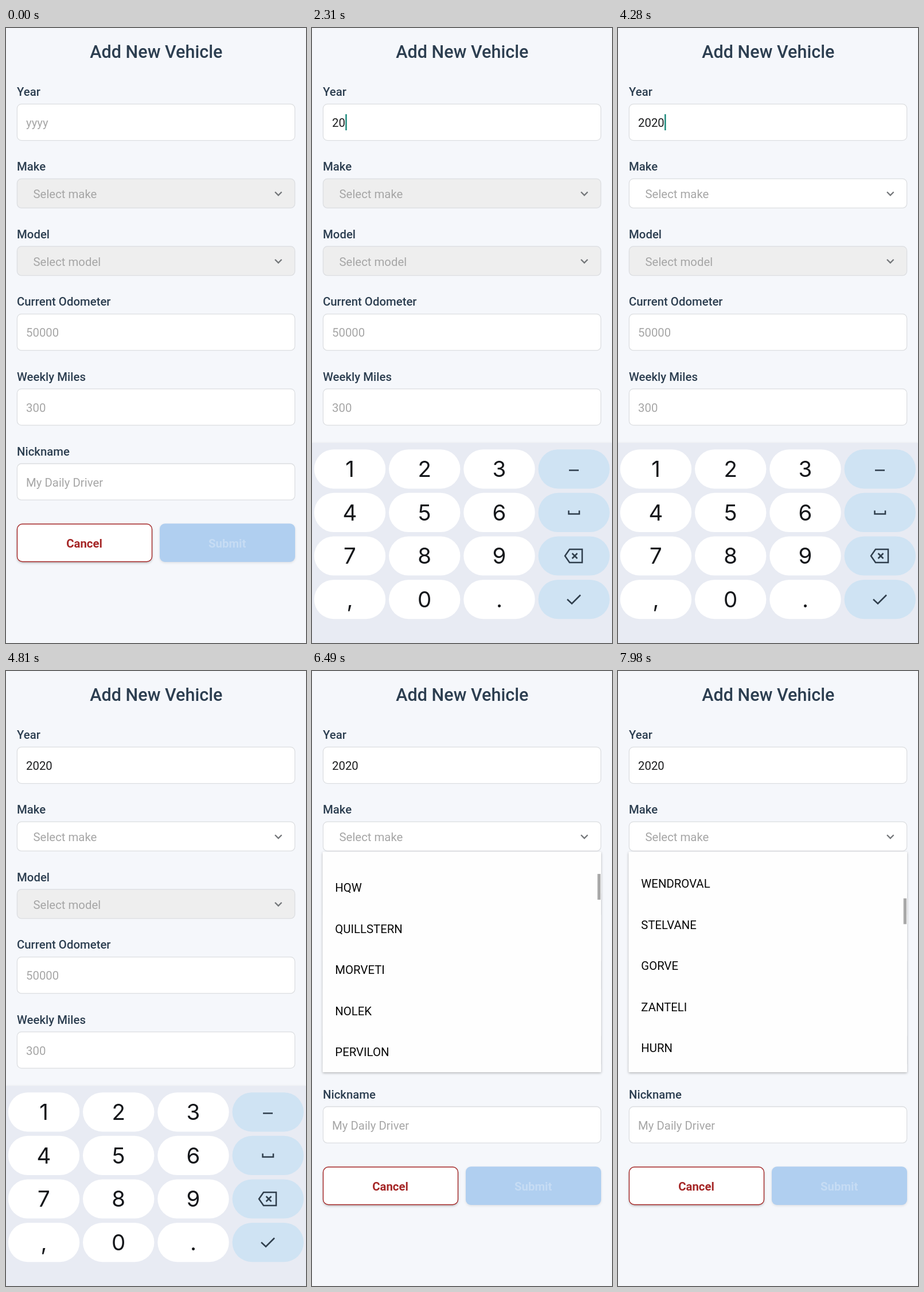
These frames come from a looping animation (523 by 1070 pixels, 8000 ms). An HTML page with a canvas:

```html
<!DOCTYPE html>
<html lang="en">
<head>
<meta charset="utf-8">
<title>Add New Vehicle</title>
<style>
  html, body { margin: 0; width: 100%; height: 100%; overflow: hidden; background: #f5f7fb; }
  canvas { display: block; width: 523px; height: 1070px; }
</style>
</head>
<body>
<canvas id="stage"></canvas>
<script>
const W = 523, H = 1070, LOOP = 8000;
const canvas = document.getElementById('stage');
const ctx = canvas.getContext('2d');
const dpr = window.devicePixelRatio || 1;
canvas.width = W * dpr;
canvas.height = H * dpr;

const BG = '#f5f7fb', INK = '#2c3e50', HINT = '#a6a6a6', TEAL = '#128577', RED = '#a52626';
const BODY = '20.36px Roboto, sans-serif';
const LABEL = '500 20.36px Roboto, sans-serif';
const BOLD = '700 20.36px Roboto, sans-serif';
const TITLE = '500 30.54px Roboto, sans-serif';
const DIGIT = '400 38.5px Inter, sans-serif';

const MAKES = ['OVELA', 'DELA VORIN', 'WEXTON LARBY', 'UDRO', 'GRENLOW', 'HQW', 'QUILLSTERN',
  'MORVETI', 'NOLEK', 'PERVILON', 'WENDROVAL', 'STELVANE', 'GORVE', 'ZANTELI', 'HURN'];
const ROW = 71.35;
const LIST = { x: 18.5, y: 314.5, w: 485.5, h: 383.5 };

// [time, value]
const TYPED = [[0, ''], [1910, '2'], [2140, '20'], [2540, '200'], [3340, '20'], [3730, '202'], [4130, '2020']];
const LOADED = [[0, 10], [5950, 20], [6030, 30], [6180, 46]];
// [time, column, row]
const PRESSES = [[2140, 1, 3], [2540, 1, 3], [3340, 3, 2], [3730, 1, 0], [4130, 1, 3], [4660, 3, 3]];
const KEYS = ['123', '456', '789', ',0.'];
const KEYBOARD_TOP = 722;

const clamp = v => Math.max(0, Math.min(1, v));
const latest = (list, t) => list.filter(e => e[0] <= t).pop()[1];
const stepped = (t, start, size) => t < start ? t : start + Math.floor((t - start) / size) * size;

function box(x, y, w, h, r, fill, stroke, line = 1.27) {
  ctx.beginPath();
  ctx.roundRect(x, y, w, h, r);
  if (fill) { ctx.fillStyle = fill; ctx.fill(); }
  if (stroke) { ctx.strokeStyle = stroke; ctx.lineWidth = line; ctx.stroke(); }
}

function text(str, x, y, font, color, align = 'left') {
  ctx.font = font;
  ctx.fillStyle = color;
  ctx.textAlign = align;
  ctx.fillText(str, x, y);
}

function line(points, color, width, close) {
  ctx.beginPath();
  points.forEach(([x, y]) => ctx.lineTo(x, y));
  if (close) ctx.closePath();
  ctx.strokeStyle = color;
  ctx.lineWidth = width;
  ctx.stroke();
}

function shadowed(blur, dy, alpha, draw) {
  ctx.save();
  ctx.shadowColor = `rgba(0,0,0,${alpha})`;
  ctx.shadowBlur = blur * dpr;
  ctx.shadowOffsetY = dy * dpr;
  draw();
  ctx.restore();
}

function field(label, y, value, color = HINT) {
  text(label, 19, y - 14, LABEL, INK);
  box(19.4, y + .4, 484.2, 63.2, 7.5, '#fff', '#dcdee1');
  text(value, 35, y + 40, BODY, color);
}

function select(label, y, hint, enabled) {
  text(label, 19, y - 14, LABEL, INK);
  box(19.4, y + .4, 484.2, 50.8, 7.5, enabled ? '#fff' : '#eeeeee', '#dcdee1');
  text(hint, 47.5, y + 34, BODY, HINT);
  line([[469, y + 23.3], [474.8, y + 29.1], [480.6, y + 23.3]], '#737679', 2.3);
}

function form(t) {
  const year = latest(TYPED, t);
  text('Add New Vehicle', 261.8, 52, TITLE, INK, 'center');
  field('Year', 132, year || 'yyyy', year ? '#1b1c1e' : HINT);
  if (t >= 1285 && t < 4660 && !(t >= 3080 && t < 3340)) {
    ctx.font = BODY;
    ctx.fillStyle = TEAL;
    ctx.fillRect(35.4 + ctx.measureText(year).width, 150, 2.4, 28);
  }
  select('Make', 262, 'Select make', t >= 4210);
  select('Model', 379.5, 'Select model', false);
  field('Current Odometer', 497.3, '50000');
  field('Weekly Miles', 627.5, '300');
  field('Nickname', 757.6, 'My Daily Driver');

  shadowed(4, 2, .28, () => box(19.5, 863, 235, 65.5, 9, '#fff'));
  box(19.5, 863, 235, 65.5, 9, null, RED, 1.4);
  text('Cancel', 136.5, 904, BOLD, RED, 'center');
  shadowed(4, 1.5, .1, () => box(268, 862.3, 236, 66.7, 9, '#b0cff0'));
  text('Submit', 385.7, 904, BOLD, '#c6dcf4', 'center');
}

function icons() {
  const c = '#2f3e4c';
  line([[448, 769.5], [465, 769.5]], c, 2.5);
  line([[447.5, 839.5], [447.5, 845.5], [466, 845.5], [466, 839.5]], c, 2.5);
  line([[449, 907], [471, 907], [471, 930], [449, 930], [441, 918.5]], c, 2.5, true);
  line([[453.5, 914], [462.5, 923]], c, 2.5);
  line([[462.5, 914], [453.5, 923]], c, 2.5);
  line([[445, 994], [453, 1001.5], [468, 986.5]], c, 2.5);
}

function keyboard(t, dy) {
  ctx.save();
  ctx.translate(0, dy);
  ctx.fillStyle = '#e8ebf3';
  shadowed(3, 0, .08, () => ctx.fillRect(0, KEYBOARD_TOP, W, H - KEYBOARD_TOP));
  for (let row = 0; row < 4; row++) {
    for (let col = 0; col < 4; col++) {
      const x = 3.8 + col * 130.25, y = 733.2 + row * 75.6;
      box(x, y, 124.4, 68.2, 34.1, col < 3 ? '#fff' : '#cfe3f3');
      for (const [at, c, r] of PRESSES) {
        if (c !== col || r !== row || t < at || t >= at + 150) continue;
        box(x, y, 124.4, 68.2, 34.1, `rgba(70,90,120,${.16 * (1 - (t - at) / 150)})`);
      }
      if (col < 3) text(KEYS[row][col], x + 62.2, y + 48, DIGIT, '#15171b', 'center');
    }
  }
  icons();
  ctx.restore();
}

function keyboardOffset(t) {
  const height = H - KEYBOARD_TOP;
  if (t < 4740) return height * Math.pow(1 - clamp((stepped(t, 1210, 75) - 1190) / 285), 4.2);
  return height * Math.pow(clamp((stepped(t, 4740, 76) - 4740) / 228), 1.6);
}

// [first step, glide end, distance]
const SWIPES = [[6180, 6730, 351.5], [7040, 7430, 228.5], [7750, 8350, 136.7]];

function scrollAt(t) {
  let sum = 0;
  for (const [start, end, dist] of SWIPES) {
    if (t < start) break;
    const from = start - 76;
    const p = t >= end ? 1 : clamp((stepped(t, start, 76) - from) / (end - from));
    sum += dist * (1 - Math.pow(1 - p, 3));
  }
  return sum;
}

function dropdown(t) {
  const { x, y, w, h } = LIST;
  const scroll = scrollAt(t);
  ctx.save();
  ctx.globalAlpha = t < 5800 ? .6 : 1;
  shadowed(4, 1.5, .28, () => box(x, y, w, h, 1, '#fefefe'));
  ctx.beginPath();
  ctx.rect(x, y, w, h);
  ctx.clip();
  MAKES.forEach((name, i) => text(name, 40.3, y + 43.4 + i * ROW - scroll, BODY, '#060606'));
  const total = latest(LOADED, t) * ROW;
  ctx.fillStyle = '#a9a9a9';
  ctx.fillRect(497.7, y + scroll * h / total, 5.3, h * h / total);
  ctx.restore();
}

function draw(t) {
  ctx.setTransform(dpr, 0, 0, dpr, 0, 0);
  ctx.lineJoin = 'miter';
  ctx.fillStyle = BG;
  ctx.fillRect(0, 0, W, H);
  form(t);
  if (t >= 1285 && t < 1435) {
    ctx.fillStyle = '#f9f9f9';
    ctx.fillRect(0, 666, W, H - 666);
  }
  if (t >= 1210 && t < 4968) keyboard(t, keyboardOffset(t));
  if (t >= 5720) dropdown(t);
}

const start = performance.now();
function tick() {
  draw((performance.now() - start) % LOOP);
  requestAnimationFrame(tick);
}
draw(0);
requestAnimationFrame(tick);
</script>
</body>
</html>
```
